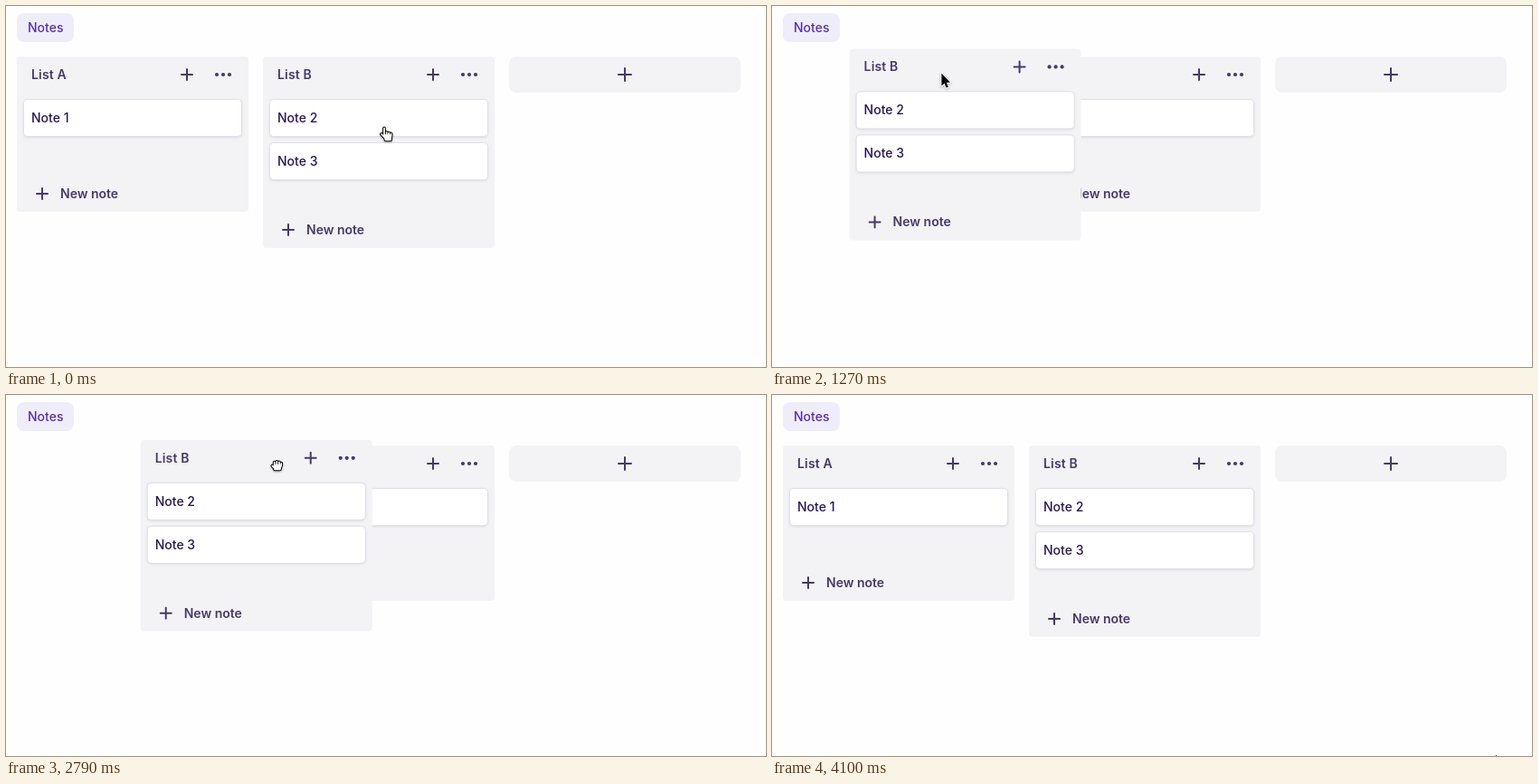
Recreate the animation shown at these times as an HTML page. Size 840 by 400 pixels, loop 4.37 s.

```html
<!DOCTYPE html>
<html lang="en">
<head>
<meta charset="utf-8">
<title>Notes board</title>
<style>
  html, body { margin: 0; width: 100%; height: 100%; overflow: hidden; background: #fefefe; }
  svg { display: block; width: 840px; height: 400px; }
  text { font: 600 14px Inter, "Noto Sans", sans-serif; fill: #463a68; }
  .title { letter-spacing: .15px; }
  .pill { fill: #f0edfa; }
  .pill + text { font-weight: 500; fill: #5430a6; }
  .panel { fill: #f3f2f5; }
  .card { fill: #fff; stroke: #e1dfe8; filter: drop-shadow(0 1px 1px rgba(40, 25, 80, .1)); }
  .card + text { font-weight: 500; fill: #281552; }
  .icon { stroke: #463a68; stroke-width: 2; stroke-linecap: round; fill: none; }
  .dot { fill: #463a68; }
  .hand { stroke-linejoin: round; stroke-linecap: round; }
  .ink { fill: #000; stroke: #000; stroke-width: 3.7; }
  .skin { fill: #fff; stroke: #fff; stroke-width: 1.7; }
  .arrow { fill: #000; stroke: #fff; stroke-width: 2; paint-order: stroke; stroke-linejoin: round; }
  #cursor { filter: drop-shadow(0 1px 1px rgba(0, 0, 0, .3)); }
</style>
</head>
<body>
<svg viewBox="0 0 840 400">
  <rect class="pill" x="12" y="8" width="63" height="32" rx="8"/>
  <text x="24" y="29">Notes</text>
  <rect class="panel" x="556" y="56" width="256" height="40" rx="8"/>
  <path class="icon" d="M677 76h14M684 69v14"/>
  <g id="listA"></g>
  <g id="listB"></g>
  <g id="cursor"></g>
</svg>
<script>
const LOOP = 4370, LEFT = 12, RIGHT = 284, TOP = 56;
const LAG = 38; // a dragged list trails the cursor by this many ms
const $ = id => document.getElementById(id);

const plus = (x, y) => `<path class="icon" d="M${x - 6} ${y}h12M${x} ${y - 6}v12"/>`;

function buildList(el, title, notes) {
  const height = 132 + notes.length * 40;
  const cards = notes.map((note, i) => `
    <rect class="card" x="7.5" y="${47.5 + i * 48}" width="241" height="41" rx="4"/>
    <text x="16" y="${73 + i * 48}">${note}</text>`).join('');
  const dots = [-1, 0, 1].map(i => `<circle class="dot" cx="${228 + i * 7}" cy="20" r="2.1"/>`).join('');
  el.innerHTML = `<rect class="panel" width="256" height="${height}" rx="4"/>
    <text class="title" x="16" y="25">${title}</text>${plus(188, 20)}${dots}${cards}
    ${plus(28, height - 20)}<text x="48" y="${height - 15}">New note</text>`;
}
buildList($('listA'), 'List A', ['Note 1']);
buildList($('listB'), 'List B', ['Note 2', 'Note 3']);

// Hands: a palm and thick finger strokes, inked black and then filled white
const hand = d => `<g class="hand"><path class="ink" d="${d}"/><path class="skin" d="${d}"/></g>`;
const shapes = {
  arrow: '<path class="arrow" d="M.4 .8v14l3.1-2.9 2.2 4.9 2.2-1-2.1-4.8H10Z"/>',
  pointer: hand('M0 8H7.6L7 13.5H1.6ZM0 8V.4M2.7 8V5M5.2 8V5.6M7.6 9V6.6M.8 11L-3 7'),
  open: hand('M-3 1H4.4L3.4 6.5H-2.4ZM-3 1L-5-4.2M-.6 0L-1.4-6.2M2 0L2.6-6M4.4 1L6-3.4M-2.8 4L-6.6 .8'),
  closed: hand('M-3 0H4.6L3.4 4.6H-2.6ZM-2.8 0V-3.2M-.2 0V-3.8M2.4 0V-3.4M4.8 0V-2.2M-3 3L-5.2 .8')
};
$('cursor').innerHTML = Object.values(shapes).join('');
const kinds = Object.keys(shapes);

const mix = (a, b, p) => a + (b - a) * p;
const clamp = p => Math.max(0, Math.min(1, p));
const smooth = p => p * p * (3 - 2 * p);
const easeOut = p => 1 - (1 - p) ** 3;
const settle = p => 1 - (1 - p) ** 4;

// Cursor moves; drags lift early and then travel level
const start = { x: 418, y: 135 };
const moves = [
  { from: 0, to: 380, x: 384.5, y: 82.5 },
  { from: 680, to: 1155, x: 187, y: 73.8, lift: easeOut },
  { from: 1270, to: 1610, x: 184.5, y: 88 },
  { from: 1620, to: 1740, x: 145.5, y: 84 },
  { from: 2340, to: 3072, x: 375, y: 77.3, lift: easeOut },
  { from: 3100, to: 3380, x: 378.5, y: 85 },
  { from: 3390, to: 4060, x: 799.5, y: 398 }
];

// Press, release and rest of list B; list A gives way at shift
const drags = [
  { down: 680, up: 1270, rest: 1600, shift: 1040, from: RIGHT, to: LEFT },
  { down: 2340, up: 3100, rest: 3430, shift: 2800, from: LEFT, to: RIGHT }
];

function cursorAt(t) {
  let { x, y } = start;
  for (const m of moves) {
    const p = clamp((t - m.from) / (m.to - m.from));
    x = mix(x, m.x, smooth(p));
    y = mix(y, m.y, (m.lift || smooth)(p));
  }
  return [x, y];
}

function heldAt(d, t) {
  const [gx, gy] = cursorAt(d.down), [x, y] = cursorAt(t - LAG);
  return [d.from + x - gx, TOP + y - gy];
}

function listB(t) {
  const d = drags.findLast(d => t >= d.down);
  if (!d) return [RIGHT, TOP];
  const [x, y] = heldAt(d, Math.min(t, d.up));
  const p = settle(clamp((t - d.up) / (d.rest - d.up)));
  return [mix(x, d.to, p), mix(y, TOP, p)];
}

function listA(t) {
  const d = drags.findLast(d => t >= d.shift);
  return d ? mix(d.to, d.from, easeOut(clamp((t - d.shift) / 200))) : LEFT;
}

function cursorKind(t, x, y) {
  const d = drags.find(d => t >= d.down && t < d.rest + 40);
  if (d) return t < d.up ? 'closed' : 'arrow';
  if (x < 540 && y > TOP && y < 100) return 'open';
  return x < 532 && y > 100 && y < 192 ? 'pointer' : 'arrow';
}

const place = (el, x, y) => el.setAttribute('transform', `translate(${x.toFixed(2)} ${y.toFixed(2)})`);

function draw(t) {
  const [x, y] = cursorAt(t);
  const kind = cursorKind(t, x, y);
  place($('listA'), listA(t), TOP);
  place($('listB'), ...listB(t));
  place($('cursor'), x, y);
  kinds.forEach((k, i) => { $('cursor').children[i].style.display = k === kind ? '' : 'none'; });
}

const begin = performance.now();
function tick() {
  draw((performance.now() - begin) % LOOP);
  requestAnimationFrame(tick);
}
tick();
</script>
</body>
</html>
```
